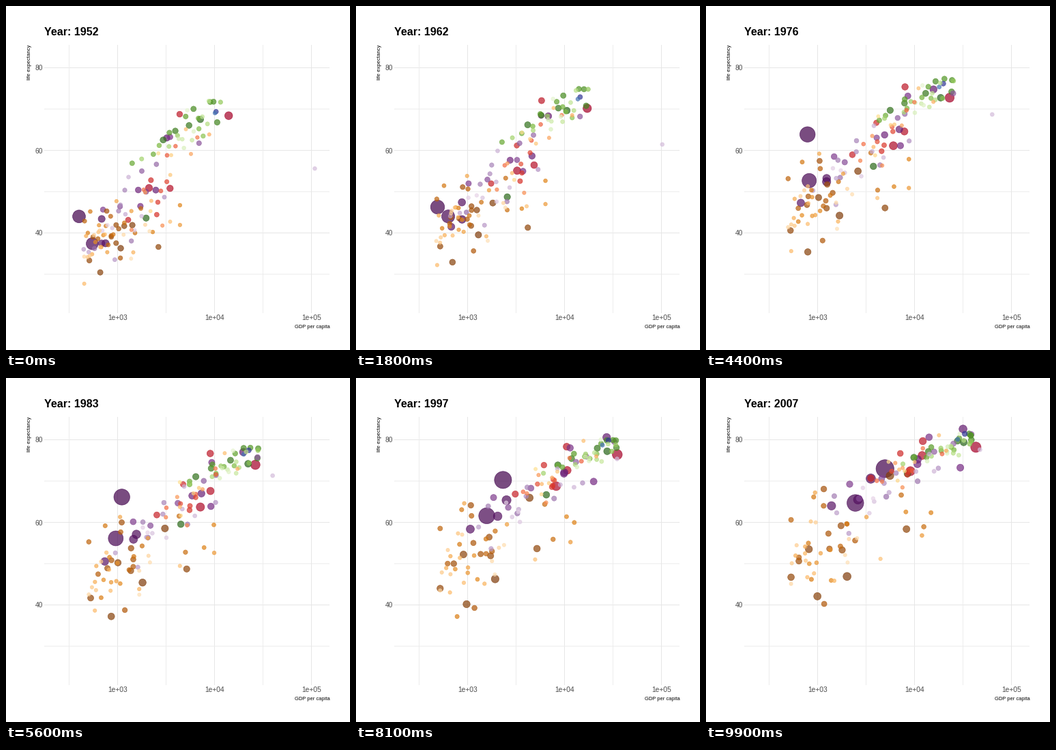
These frames come from a looping animation (504 by 504 pixels, 10000 ms). A matplotlib script:

```python
import numpy as np
import matplotlib.pyplot as plt
from matplotlib.animation import FuncAnimation

SIZE, FRAMES, KNOTS = 504, 100, 12
FIRST, LAST = 1952, 2007
T = np.linspace(0, 1, KNOTS)
EASE = T ** .7  # early gains are the fastest
rng = np.random.default_rng(5)
plt.rcParams["font.family"] = "Liberation Sans"

# Ranges run from the first to the last year; dots are ranked by population,
# which fades by `decay` per rank after the leading values in `top`.
GROUPS = {
    "africa": dict(n=52, cmap="PuOr", tint=(0, .4), top=[135], decay=.14, share=.28,
                   gdp=(2.98, 3.2), gdp_sd=(.26, .38), skew=.25,
                   life=(39.2, 54.5), life_sd=(4.6, 8), rho=.4),
    "americas": dict(n=25, cmap="RdYlBu", tint=(0, .4), top=[301], decay=.4, share=.42,
                     gdp=(3.47, 3.91), gdp_sd=(.22, .22), skew=.1,
                     life=(53, 73.5), life_sd=(8, 3.4), rho=.65),
    "asia": dict(n=33, cmap="PRGn", tint=(0, .4), top=[1319, 1110, 224], decay=.17,
                 share=.42, gdp=(3.17, 3.88), gdp_sd=(.33, .5), skew=.05,
                 life=(47, 71), life_sd=(8, 6.5), rho=.75),
    "europe": dict(n=30, cmap="PiYG", tint=(1, .6), top=[82], decay=.14, share=.75,
                   gdp=(3.7, 4.33), gdp_sd=(.24, .22), skew=-.15,
                   life=(65, 77.8), life_sd=(5, 2.5), rho=.85),
    "oceania": dict(n=2, cmap="RdYlBu", tint=(1, .9), top=[20], decay=1.6, share=.5,
                    gdp=(4.01, 4.47), gdp_sd=(.01, .05), skew=0,
                    life=(69.2, 80.7), life_sd=(.2, .5), rho=.8),
}

# Evenly timed (GDP, life expectancy) points of the dots that stand out, by rank.
PATHS = {
    "africa": {0: [(1077, 36.3), (1780, 45.2), (2014, 46.9)],
               1: [(1419, 41.9), (5581, 71.3)],
               24: [(493, 40), (863, 46.2)]},
    "americas": {0: [(13990, 68.4), (42952, 78.2)],
                 1: [(2109, 50.9), (6900, 62.4), (9066, 72.4)],
                 2: [(3478, 50.8), (8700, 66.3), (11978, 76.2)]},
    "asia": {0: [(400, 44), (500, 46.5), (690, 63.4),
                 (1220, 66.7), (2150, 70), (4959, 73)],
             1: [(547, 37.4), (710, 49.5), (1090, 59), (2452, 64.7)],
             2: [(750, 37.5), (1000, 48.1), (1900, 61), (3541, 70.6)],
             3: [(685, 43.4), (2606, 65.5)],
             4: [(684, 37.5), (670, 48.5), (1391, 64)],
             5: [(3217, 63), (12700, 72.7), (24000, 78.9), (31656, 82.6)],
             28: [(108382, 55.6), (96900, 66.3), (27000, 73.5), (47307, 77.6)]},
    "europe": {0: [(7144, 67.5), (21000, 73.4), (32170, 79.4)],
               1: [(1969, 43.6), (8458, 71.8)]},
}
CRISIS = dict(rank=24, year=1992, depth=21, years=8)


def resample(values):
    return np.interp(T, np.linspace(0, 1, len(values)), values)


def between(ends):
    return (ends[0] + (ends[1] - ends[0]) * EASE)[:, None]


def drift(n):
    """Evenly spread scores that wander over the years, shape (KNOTS, n)."""
    u = (rng.permutation(n) + .5) / n
    start = .55 * np.log(u / (1 - u))
    end = .85 * start + .5 * rng.normal(size=n)
    noise = np.cumsum(rng.normal(0, .06, (KNOTS, n)), axis=0)
    return np.clip(start + np.outer(T, end - start) + noise, -1.9, 1.9)


def fold(values, limit):
    """Bend values above the limit back below it."""
    return values - 1.3 * np.maximum(0, values - limit)


def build(name):
    g = GROUPS[name]
    n, rho = g["n"], g["rho"]
    wealth, health = drift(n), drift(n)
    skewed = wealth + g["skew"] * (wealth ** 2 - 1)
    mixed = rho * wealth + np.sqrt(1 - rho ** 2) * health
    gdp = fold(between(g["gdp"]) + between(g["gdp_sd"]) * skewed, between((4.15, 4.6)))
    life = fold(between(g["life"]) + between(g["life_sd"]) * mixed, between((72, 81.5)))

    for rank, points in PATHS.get(name, {}).items():
        income, years = np.array(points, float).T
        gdp[:, rank], life[:, rank] = resample(np.log10(income)), resample(years)
    if name == "africa":
        away = abs(FIRST + (LAST - FIRST) * T - CRISIS["year"]) / CRISIS["years"]
        life[:, CRISIS["rank"]] -= CRISIS["depth"] * np.maximum(0, 1 - away)

    *lead, base = g["top"]
    tail = base * np.exp(-g["decay"] * np.arange(n - len(lead)))
    pop = np.outer(g["share"] + (1 - g["share"]) * T, np.append(lead, tail))
    colors = plt.get_cmap(g["cmap"])(np.linspace(*g["tint"], n), alpha=.7)
    return gdp, life, pop, colors


gdp, life, pop, colors = zip(*map(build, GROUPS))
gdp, life, pop, colors = np.hstack(gdp), np.hstack(life), np.hstack(pop), np.vstack(colors)
order = np.argsort(-pop[-1])
gdp, life, pop, colors = gdp[:, order], life[:, order], pop[:, order], colors[order]


def px(log_gdp):
    return 163.5 + 142 * (log_gdp - 3)


def py(years):
    return 332.5 - 6.05 * (years - 40)


fig = plt.figure(figsize=(SIZE / 72, SIZE / 72), dpi=72, facecolor="white")
ax = fig.add_axes([0, 0, 1, 1])
ax.set(xlim=(0, SIZE), ylim=(SIZE, 0))
ax.axis("off")

MAJOR, MINOR = "#e6e6e6", "#ececec"
grid = dict(lw=1, zorder=1, snap=False, solid_capstyle="butt")
for k in range(6):
    x, y = px(2.5 + .5 * k), py(80 - 10 * k)
    ax.plot([56, 474], [y, y], color=MINOR if k % 2 else MAJOR, **grid)
    ax.plot([x, x], [57, 450], color=MAJOR if k % 2 else MINOR, **grid)

tick = dict(size=10.3, color="#4d4d4d")
for v in (40, 60, 80):
    ax.text(54, py(v), str(v), ha="right", va="center_baseline", **tick)
for e in (3, 4, 5):
    ax.text(px(e), 460.5, f"1e+0{e}", ha="center", va="baseline", **tick)
ax.text(474.5, 472, "GDP per capita", size=7.5, ha="right", va="baseline")
ax.text(34, 57, "life expectancy", size=7.8, rotation=90, ha="center", va="top")
title = ax.text(56.5, 43, "", size=16, weight="bold", va="baseline")

dots = ax.scatter(gdp[0], life[0], c=colors, edgecolors=colors,
                  linewidths=.7, zorder=2)


def draw(i):
    t = i / (FRAMES - 1)
    pos = t * (KNOTS - 1)
    k = min(int(pos), KNOTS - 2)
    f = pos - k
    g, l, p = (a[k] * (1 - f) + a[k + 1] * f for a in (gdp, life, pop))
    size = 2 + 10 * np.sqrt(p / 1319)
    dots.set_offsets(np.column_stack([px(g), py(l)]))
    dots.set_sizes((.75 * (2.845 * size + .945)) ** 2)
    title.set_text(f"Year: {round(FIRST + (LAST - FIRST) * t)}")
    return dots, title


anim = FuncAnimation(fig, draw, frames=FRAMES, interval=100, repeat=True,
                     repeat_delay=0, blit=False)
plt.show()
```
